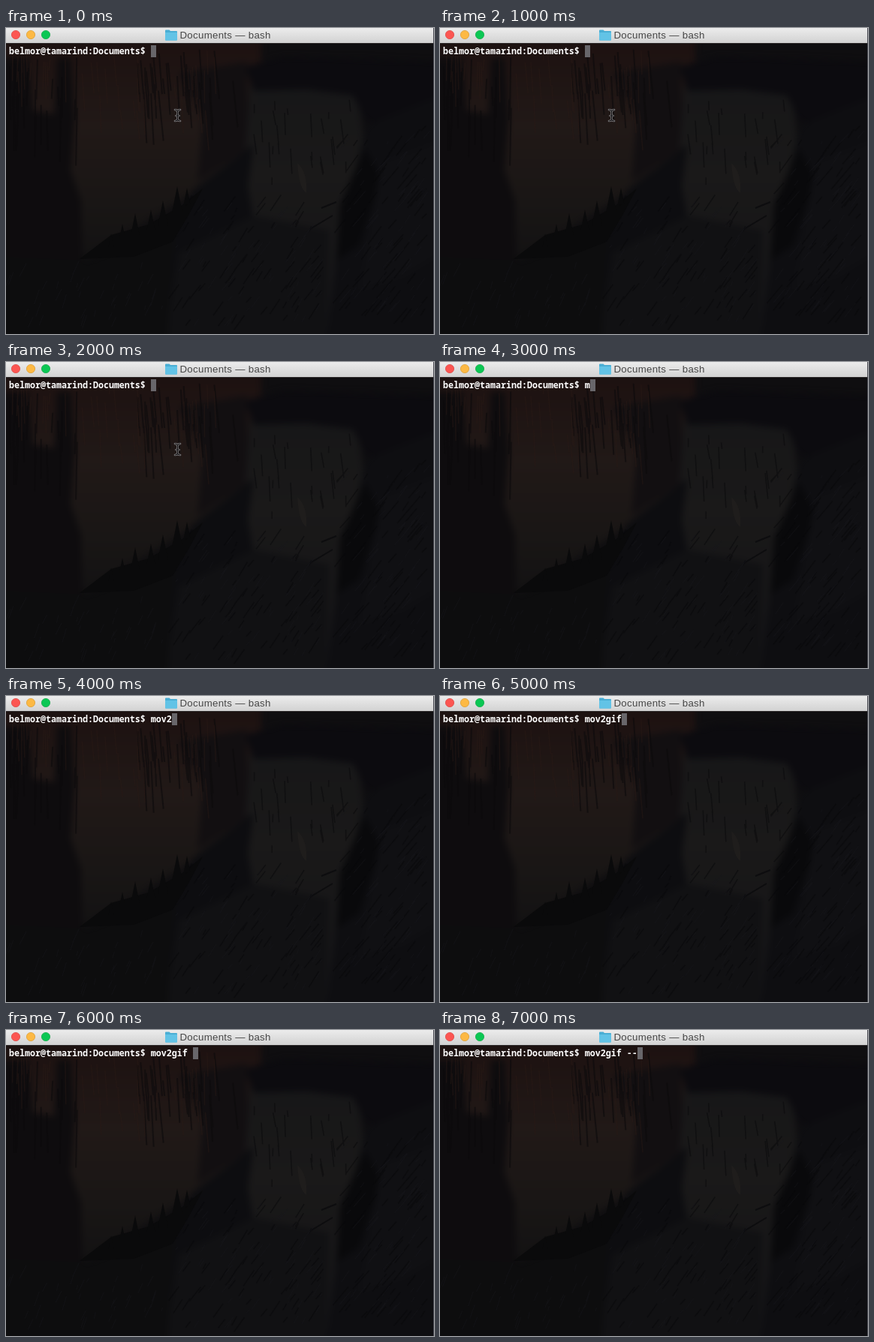
An HTML page for the animation above (8000 ms loop, 570 px wide and 408 px high).

```html
<!DOCTYPE html>
<html lang="en">
<head>
<meta charset="utf-8">
<title>Terminal</title>
<style>
  html, body { margin: 0; width: 100%; height: 100%; overflow: hidden; background: #0f0e10; }
  svg { display: block; width: 570px; height: 408px; }
  .title { font: 13.25px "Liberation Sans", Arial, sans-serif; letter-spacing: .3px; fill: #464646; }
  .term { font: bold 11.667px "Noto Sans Mono", "DejaVu Sans Mono", monospace; fill: #fff; white-space: pre; }
</style>
</head>
<body>
<svg viewBox="0 0 570 408" xmlns="http://www.w3.org/2000/svg">
  <defs>
    <linearGradient id="bar" x2="0" y2="1">
      <stop offset="0" stop-color="#ececec"/>
      <stop offset="1" stop-color="#d2d2d2"/>
    </linearGradient>
    <linearGradient id="cliff" x2="0" y2="1">
      <stop offset="0" stop-color="#1d1110"/>
      <stop offset=".4" stop-color="#211917"/>
      <stop offset=".75" stop-color="#191615"/>
      <stop offset="1" stop-color="#131213"/>
    </linearGradient>
    <linearGradient id="dome" x2="0" y2="1">
      <stop offset="0" stop-color="#171718"/>
      <stop offset=".35" stop-color="#1a1919"/>
      <stop offset="1" stop-color="#131316"/>
    </linearGradient>
    <filter id="soft" x="-10%" y="-10%" width="120%" height="120%" color-interpolation-filters="sRGB">
      <feGaussianBlur stdDeviation="4"/>
    </filter>
    <filter id="faint" color-interpolation-filters="sRGB"><feGaussianBlur stdDeviation=".7"/></filter>
    <clipPath id="view"><rect y="20" width="570" height="388"/></clipPath>
  </defs>

  <rect width="570" height="408" fill="#0f0e10"/>
  <g clip-path="url(#view)">
    <g filter="url(#soft)">
      <path d="M-10 10H340V150L240 225L150 280L100 310L-10 300Z" fill="url(#cliff)"/>
      <path d="M-10 40H30L36 110L64 115L68 40H86L92 120L86 190L100 230L102 310H-10Z" fill="#0e0c0e"/>
      <path d="M230 60L320 45L325 160L255 205L262 120Z" fill="#120f11"/>
      <path d="M325 75L400 78L470 88L478 170L445 260L430 420H330L318 180Z" fill="url(#dome)"/>
      <path d="M318 52L370 38L580 45V130L480 125L462 90L400 82L330 84Z" fill="#0c0b0f"/>
      <path d="M330 155L322 210L335 290L330 420H200L215 300L250 215Z" fill="#0d0d10"/>
      <path d="M330 250L430 270L425 420H210L230 300Z" fill="#111113"/>
      <path d="M-10 305L110 310L225 265L215 420H-10Z" fill="#0d0d0e"/>
      <path d="M480 130L580 90V420H425L447 265Z" fill="#0e0e11"/>
      <path d="M478 160L500 200L470 290L440 310L445 235Z" fill="#09090b"/>
      <path d="M500 180L580 150V300L530 330L470 350Z" fill="#101013"/>
    </g>
    <g filter="url(#faint)" fill="none">
      <path d="M98 308L140 276L190 262L235 236L262 214L245 246L222 285L170 305Z" fill="#0a0a0b"/>
      <path d="M388 180Q402 192 400 220Q390 214 388 180Z" fill="#1f1d1c"/>
      <path d="M420 240L440 232M405 268L435 250" stroke="#0d0d0f" stroke-width="2"/>
      <path id="streaks" stroke="#0d0a0c" stroke-width="2" opacity=".6"/>
      <path id="glow" stroke="#2a1b17" stroke-width="1.5" opacity=".45"/>
      <path id="cracks" stroke="#08080a" stroke-width="1.5" opacity=".5"/>
      <path id="ridges" stroke="#1b1b1e" stroke-width="1.2" opacity=".4"/>
      <path id="trees" fill="#0a0a0b"/>
    </g>
  </g>

  <rect width="570" height="20" fill="url(#bar)"/>
  <rect y="20" width="570" height="1" fill="#2b2728"/>
  <rect x="569" width="1" height="408" fill="#4b4c54"/>
  <g stroke-width=".8">
    <circle cx="13" cy="9" r="5.6" fill="#fc5652" stroke="#df4744"/>
    <circle cx="33" cy="9" r="5.6" fill="#fdb944" stroke="#de9f34"/>
    <circle cx="53" cy="9" r="5.6" fill="#0bc754" stroke="#12ac48"/>
  </g>
  <path d="M212 3.5Q212 2.5 213 2.5H217.500L219 4H227Q228 4 228 5V15.500Q228 16.500 227 16.500H213Q212 16.500 212 15.500Z" fill="#4aaed4"/>
  <path d="M212 6H228V15.500Q228 16.500 227 16.500H213Q212 16.500 212 15.500Z" fill="#62c3e6"/>
  <text class="title" x="231.500" y="14">Documents — bash</text>

  <rect id="caret" y="23" width="7" height="16" fill="#68666a"/>
  <text id="line" class="term" x="4" y="35" xml:space="preserve"></text>
  <g id="beam" fill="none" stroke-linecap="round">
    <path id="beamEdge" d="M225 109Q228.500 109 228.500 112V121Q228.500 124 225 124M232 109Q228.500 109 228.500 112M228.500 121Q228.500 124 232 124M226.500 117H230.500" stroke="#858385" stroke-width="2.6"/>
    <path id="beamCore" stroke="#111012" stroke-width="1.1"/>
  </g>
</svg>
<script>
  const $ = id => document.getElementById(id);
  const PROMPT = 'belmor@tamarind:Documents$ ';
  const COMMAND = 'mov2gif --';
  const LOOP = 8000, STEP = 1000, CELL = 7, LEFT = 4;
  const typed = [0, 0, 0, 1, 4, 7, 8, 10];

  let seed = 17;
  const rand = (lo, hi) => {
    seed = (seed * 16807) % 2147483647;
    return lo + (hi - lo) * seed / 2147483647;
  };

  // Random strokes starting inside a box; lean is the sideways drift per unit of height.
  function strokes(count, x0, x1, y0, y1, minLen, maxLen, lean = 0) {
    let d = '';
    for (let i = 0; i < count; i++) {
      const x = rand(x0, x1), y = rand(y0, y1), h = rand(minLen, maxLen);
      const dx = lean * h + rand(-2, 2);
      d += `M${x.toFixed(1)} ${y.toFixed(1)}l${dx.toFixed(1)} ${h.toFixed(1)}`;
    }
    return d;
  }

  function tree(x, y, h) {
    const w = h * 0.2;
    return `M${x} ${y - h}L${x + w} ${y}H${x - w}Z`;
  }

  $('streaks').setAttribute('d',
    strokes(24, 5, 95, 30, 120, 25, 80) + strokes(34, 175, 310, 28, 90, 20, 75, 0.08));
  $('glow').setAttribute('d',
    strokes(14, 5, 80, 25, 60, 15, 60) + strokes(30, 95, 285, 24, 110, 15, 55, 0.05));
  $('cracks').setAttribute('d',
    strokes(70, 225, 425, 210, 390, 5, 22, -0.7) + strokes(70, 450, 565, 130, 380, 6, 26, -0.8) +
    strokes(25, 330, 465, 85, 200, 8, 35, 0.1));
  $('ridges').setAttribute('d',
    strokes(60, 225, 425, 230, 390, 4, 18, -0.7) + strokes(60, 450, 565, 130, 380, 4, 20, -0.8) +
    strokes(40, 5, 210, 310, 390, 5, 20, -0.4));
  $('trees').setAttribute('d',
    tree(193, 270, 28) + tree(209, 264, 34) + tree(228, 246, 35) + tree(241, 235, 22) +
    tree(172, 276, 29) + tree(155, 281, 20) + tree(140, 292, 18));
  $('beamCore').setAttribute('d', $('beamEdge').getAttribute('d'));

  function draw(ms) {
    const step = Math.floor((ms % LOOP) / STEP);
    const n = typed[step];
    $('line').textContent = PROMPT + COMMAND.slice(0, n);
    $('caret').setAttribute('x', LEFT + CELL * (PROMPT.length + n));
    $('beam').setAttribute('visibility', n ? 'hidden' : 'visible');
  }

  const start = performance.now();
  function tick() {
    draw(performance.now() - start);
    requestAnimationFrame(tick);
  }
  tick();
</script>
</body>
</html>
```
